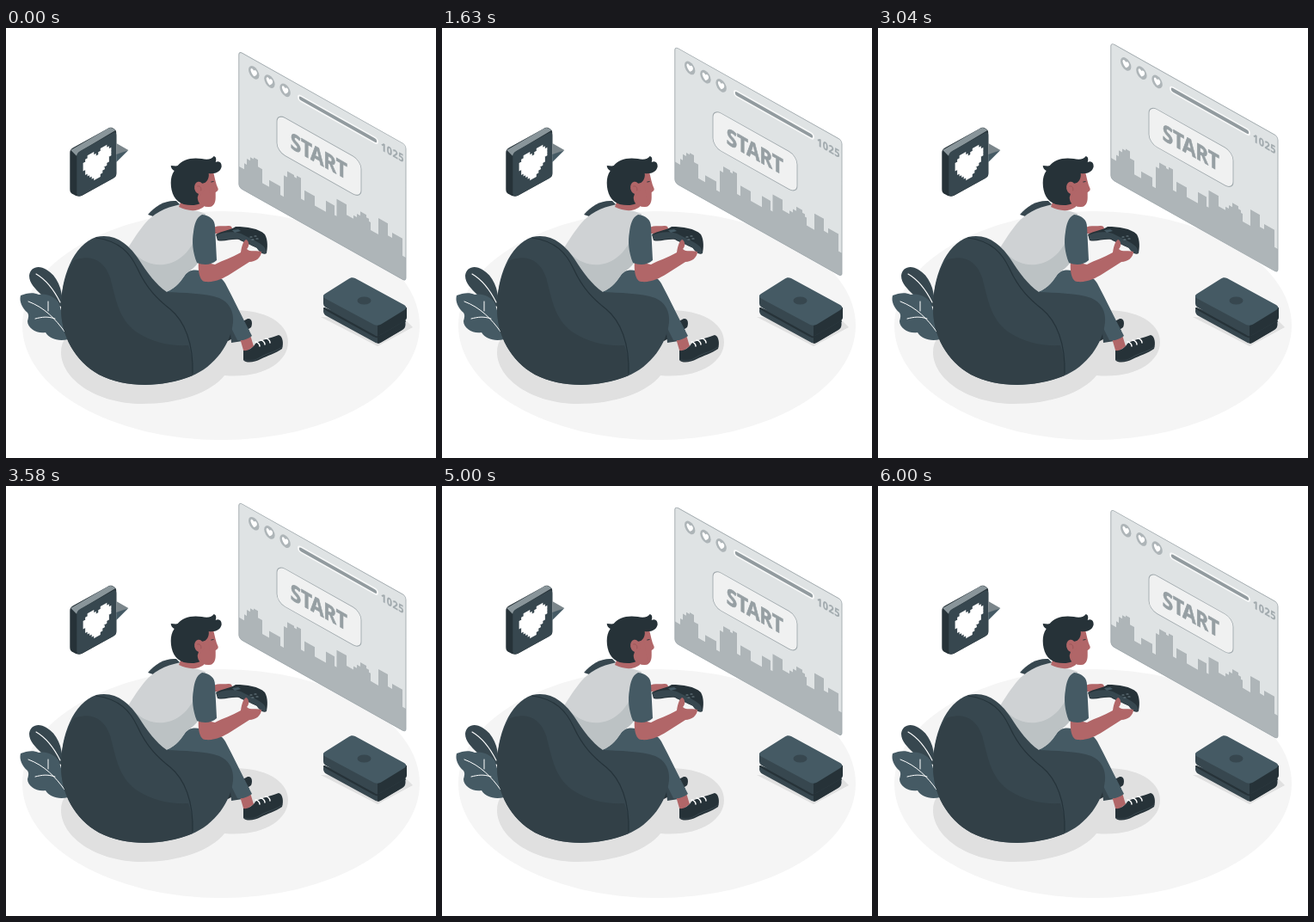
Recreate the animation shown at these times as an HTML page with a canvas. Size 500 by 500 pixels, loop 6040 ms.

```html
<!DOCTYPE html>
<html lang="en">
<head>
<meta charset="utf-8">
<title>Game night</title>
<style>
html, body { margin: 0; width: 100%; height: 100%; overflow: hidden; background: #fff; }
canvas { display: block; width: 500px; height: 500px; }
</style>
</head>
<body>
<canvas id="stage"></canvas>
<script>
const LOOP = 6040, LIFT = 10, SLOPE = 0.562, ISO = 0.866;
const C = {
  ink: '#263238', dark: '#324047', navy: '#37474f', slate: '#455a64',
  skin: '#b16668', shade: '#9a5557', shirt: '#cfd2d4', fold: '#bcc2c4',
  floor: '#f5f5f5', shadow: '#e0e0e0', glass: '#dfe3e4', line: '#a0a9ad',
  city: '#aeb5b8', pale: '#f0f1f1'
};
const canvas = document.getElementById('stage');
const ctx = canvas.getContext('2d');
const dpr = window.devicePixelRatio || 1;
canvas.width = canvas.height = 500 * dpr;

function fill(d, color) {
  ctx.fillStyle = color;
  ctx.fill(new Path2D(d));
}
function stroke(d, color, width) {
  ctx.strokeStyle = color;
  ctx.lineWidth = width;
  ctx.stroke(new Path2D(d));
}
function oval(x, y, rx, ry, color, turn = 0) {
  ctx.fillStyle = color;
  ctx.beginPath();
  ctx.ellipse(x, y, rx, ry, turn, 0, Math.PI * 2);
  ctx.fill();
}
function roundBox(x, y, w, h, r) {
  ctx.beginPath();
  ctx.roundRect(x, y, w, h, r);
}
function label(text, x, y, size, color, weight, spacing) {
  ctx.save();
  ctx.translate(x, y);
  ctx.scale(ISO, 1);
  ctx.font = `bold ${size}px "Noto Sans", sans-serif`;
  ctx.letterSpacing = spacing + 'px';
  ctx.textAlign = 'center';
  ctx.fillStyle = ctx.strokeStyle = color;
  ctx.lineWidth = weight;
  ctx.fillText(text, 0, 0);
  ctx.strokeText(text, 0, 0);
  ctx.restore();
}

function ground() {
  oval(250, 346, 231, 133, C.floor);
  fill('M64 377C64 408 105 437 158 437C202 437 238 424 254 404C298 408 328 389 328 365C328 341 298 327 262 328L150 330C100 330 64 350 64 377Z', C.shadow);
  fill('M366 336L432 370L473 348L466 341Z', C.shadow);
}

function plant() {
  fill('M27 288C28 278 38 275 47 281C59 288 66 302 66 324C55 323 48 318 41 310C34 303 27 297 27 288Z', C.navy);
  stroke('M35 286C47 293 56 305 63 319', '#fff', 1.1);
  fill('M17 311C24 308 32 307 38 310C46 308 56 312 61 319C65 329 67 342 72 362C61 365 50 361 46 354C36 356 25 349 25 341C26 337 27 334 25 331C19 326 15 318 17 311Z', C.slate);
  stroke('M26 318C45 325 58 339 68 353M49 329L49 318M57 338C48 335 42 336 34 338', '#fff', 1);
}

function bubble() {
  ctx.save();
  ctx.translate(-0.7, 0);
  fill('M75 145C75 142 76 141 79 139L119 117C122 115 124 116 126 117C129 119 129 120 129 124L129 169C129 172 128 173 125 175L89 195C86 196 83 196 80 194C76 192 75 191 75 187Z', C.ink);
  fill('M76 142L119 117C122 115 125 116 128 119L86 144C84 145 83 147 83 149Z', '#89959a');
  fill('M83 151C83 147 84 145 87 143L125 122C128 120 129 122 129 125L129 169C129 172 128 173 125 175L88 195C85 196 83 195 83 192Z', C.navy);
  fill('M129 134L143 142L129 148Z', '#7b868b');
  fill('M129 147L143 142L129 156Z', C.slate);
  ctx.restore();
  const rows = [[2, 4], [1, 5], [0, 6], [0, 6], [0, 6], [1, 6], [1, 6], [2, 6], [3, 6], [4, 6], [5, 6]];
  const w = 2.52, h = 2.95;
  ctx.save();
  ctx.transform(1, -0.56, 0, 1, 106, 142);
  ctx.beginPath();
  rows.forEach(([a, b], i) => {
    ctx.rect((a - 6.5) * w, i * h, (b - a + 1) * w, h + 0.6);
    ctx.rect((5.5 - b) * w, i * h, (b - a + 1) * w, h + 0.6);
  });
  ctx.fillStyle = '#fff';
  ctx.fill();
  ctx.restore();
}

// Left edge and roof height of each block, in panel space.
const skyline = [
  [0, 133], [6, 126], [9, 119], [13, 115], [17, 113], [22, 121], [27, 137], [35, 129], [48, 139],
  [52, 114], [56, 107], [64, 109], [67, 106], [72, 130], [76, 118], [88, 129],
  [101, 116], [111, 127], [113.5, 107], [125, 119], [133, 115], [137, 111], [141, 106],
  [148, 109], [151, 112], [153, 121], [162, 102], [173, 116], [178, 110], [190, 130]
];

function panel(lift) {
  ctx.save();
  ctx.transform(1, SLOPE, 0, 1, 271, 28 - lift);
  roundBox(-0.2, -0.9, 194.2, 158.4, 4);
  ctx.fillStyle = C.glass;
  ctx.fill();
  ctx.save();
  ctx.clip();
  ctx.beginPath();
  ctx.moveTo(0, 160);
  skyline.forEach(([x, y], i) => {
    const next = skyline[i + 1];
    ctx.lineTo(x, y);
    ctx.lineTo(next ? next[0] : 195, y);
  });
  ctx.lineTo(195, 160);
  ctx.fillStyle = C.city;
  ctx.fill();
  ctx.restore();
  roundBox(-0.2, -0.9, 194.2, 158.4, 4);
  ctx.strokeStyle = C.line;
  ctx.lineWidth = 0.9;
  ctx.stroke();

  for (let i = 0; i < 3; i++) {
    ctx.save();
    ctx.translate(17.2 + i * 18.2, 14.2);
    oval(0, 0, 6.2, 7, C.city);
    fill('M0 4.3C-5 0.5 -4.2 -3.6 -2 -3.6C-0.8 -3.6 0 -2.6 0 -1.9C0 -2.6 0.8 -3.6 2 -3.6C4.2 -3.6 5 0.5 0 4.3Z', '#fff');
    ctx.restore();
  }
  stroke('M72 13.7L158 13.7', '#f8f9f9', 8);
  stroke('M72 13.7L158 13.7', '#929b9f', 4.4);
  label('1025', 178.5, 21, 12.6, C.line, 0.2, 0.6);

  roundBox(44, 46.5, 98, 44, 9.5);
  ctx.fillStyle = C.pale;
  ctx.fill();
  ctx.strokeStyle = C.line;
  ctx.lineWidth = 0.9;
  ctx.stroke();
  label('START', 92.6, 78, 26, '#969fa3', 0.7, -0.4);
  ctx.restore();
}

function gameBox() {
  fill('M370 325C368 329 369 333 373 335L428 365C431 367 434 367 437 365L462 350C465 348 465 344 464 340L432 346Z', C.navy);
  fill('M432 354L464 336L464 346C464 348 463 349 461 351L437 365C435 366 433 367 432 367Z', C.ink);
  stroke('M370 326L428 358C431 360 434 360 437 358L464 341', C.ink, 2);
  fill('M369 312L369 320C369 322 370 324 372 325L428 356C431 358 434 358 437 356L463 341C465 339 466 338 466 335L466 325Z', C.navy);
  fill('M432 346L466 325L466 335C466 338 465 339 463 341L437 356C435 357 433 358 432 358Z', C.ink);
  fill('M371 309L398 292C401 290 403 290 406 291L463 322C466 324 466 326 463 328L437 344C434 346 431 346 428 345L372 315C368 313 368 311 371 309Z', C.slate);
  oval(416.5, 317, 8, 4.5, C.navy);
}

function legs() {
  fill('M255 352L281 338C286 337 287 343 285 348L275 355L258 364Z', C.ink);
  fill('M258 318L283 352L275 364L262 366Z', C.navy);
  fill('M272 361L284 357L288 370L277 378Z', C.skin);
  fill('M185 308L204 289C212 281 222 279 232 285C244 286 251 290 255 297C265 316 275 337 286 358C281 362 275 364 269 363L250 325L205 335Z', C.slate);
  fill('M276 375C281 376 287 372 290 367C297 362 308 361 317 357C322 358 323 367 321 373C314 378 304 381 296 385C289 389 279 390 276 386Z', C.ink);
  stroke('M277 386C286 389 292 385 299 381C307 377 315 376 321 371', '#3d4b52', 0.8);
  stroke('M290 365C293 365 295 368 295 370M296 363C299 363 301 366 301 368M302 361C305 361 307 364 307 366', '#fff', 1.5);
}

function torso() {
  fill('M165 217C173 207 185 200 198 201L204 207L180 222Z', C.navy);
  fill('M203 205C184 209 171 216 161 228C153 238 148 246 143 254L140 264L170 305L186 307C199 302 204 293 209 286C215 281 220 278 224 272L232 216C223 212 211 212 203 205Z', C.shirt);
  fill('M149 262C172 285 205 277 219 247L224 272C220 278 215 281 209 286C204 293 199 302 186 307L170 305Z', C.fold);
}

function beanbag() {
  fill('M64 326C64 290 78 252 105 243C126 238 143 251 155 270C164 284 174 298 187 307C205 308 232 308 248 314C260 319 265 330 264 342C262 366 243 394 215 405C182 418 139 419 108 403C80 387 64 358 64 326Z', C.navy);
  fill('M79 270C99 263 114 270 121 290C128 315 130 337 151 353C170 366 192 370 212 369C216 380 217 390 217 404C182 418 139 419 108 403C80 387 64 358 64 326C64 304 69 285 79 270Z', C.dark);
  stroke('M105 244C132 248 144 261 153 280C164 304 177 316 191 327C208 341 218 367 217 402', '#25333a', 1.2);
}

function head() {
  fill('M204 200L229 194L230 208C222 214 211 213 201 208Z', C.skin);
  ctx.save();
  ctx.translate(-1.3, 0);
  fill('M218 168L242 166C244 173 245 181 248 187C248 190 246 190 245 191L245 197C245 203 243 208 237 208C228 208 219 203 216 196Z', C.skin);
  stroke('M240 179L242.5 178.5', C.ink, 0.9);
  fill('M208 205C198 202 193 192 193 180C193 175 194 170 197 166C195 165 193 163 193 160C196 160 199 161 201 160C206 153 217 150 229 152C236 154 241 152 243 149C246 150 246 153 245 156C249 154 252 156 252 161C251 167 245 170 237 169C238 175 234 180 231 181L227 204C221 207 214 206 208 205Z', C.ink);
  fill('M229 181L236 179L241 207C231 209 224 205 224 197Z', C.skin);
  oval(226, 186, 5.6, 7.3, C.skin, -0.2);
  stroke('M224 184C227 183 229 186 228 189', C.shade, 0.9);
  ctx.restore();
}

function arms() {
  fill('M240 233C245 229 252 231 259 230C264 230 264 235 260 237C254 239 247 239 242 239Z', C.skin);
  fill('M244 240C250 236 262 235 267 231C280 231 294 233 301 240C305 247 304 256 303 262C299 264 295 261 292 256C284 252 276 249 271 246C262 245 253 249 246 247Z', C.ink);
  fill('M245 241C253 237 263 236 273 239L289 247C296 251 302 253 303 262C298 263 294 259 291 255C283 251 276 248 271 245C262 244 253 248 246 246Z', C.navy);
  fill('M263 235L270 234L273 236L266 238Z', C.slate);
  stroke('M284 243L286 243M289 242L291 242M286 246L288 246M291 245L293 245', '#71828a', 1.2);
  fill('M224 271C223 282 225 295 232 295C243 296 253 291 261 286L283 272C290 272 297 267 297 260C291 258 284 261 280 257C284 253 282 247 279 246C275 249 274 255 273 261C263 267 252 270 243 275Z', C.skin);
  fill('M228 217C237 218 243 223 243 231L245 270C239 276 229 276 222 273C217 261 216 248 218 237C219 229 221 220 228 217Z', C.slate);
}

function draw(time) {
  const phase = (time % LOOP) / LOOP;
  ctx.setTransform(dpr, 0, 0, dpr, 0, 0);
  ctx.lineCap = ctx.lineJoin = 'round';
  ctx.fillStyle = '#fff';
  ctx.fillRect(0, 0, 500, 500);
  ground();
  plant();
  bubble();
  panel(LIFT * (1 - Math.abs(1 - 2 * phase)));
  gameBox();
  legs();
  torso();
  beanbag();
  head();
  arms();
}

const start = performance.now();
function tick() {
  draw(performance.now() - start);
  requestAnimationFrame(tick);
}
tick();
</script>
</body>
</html>
```
